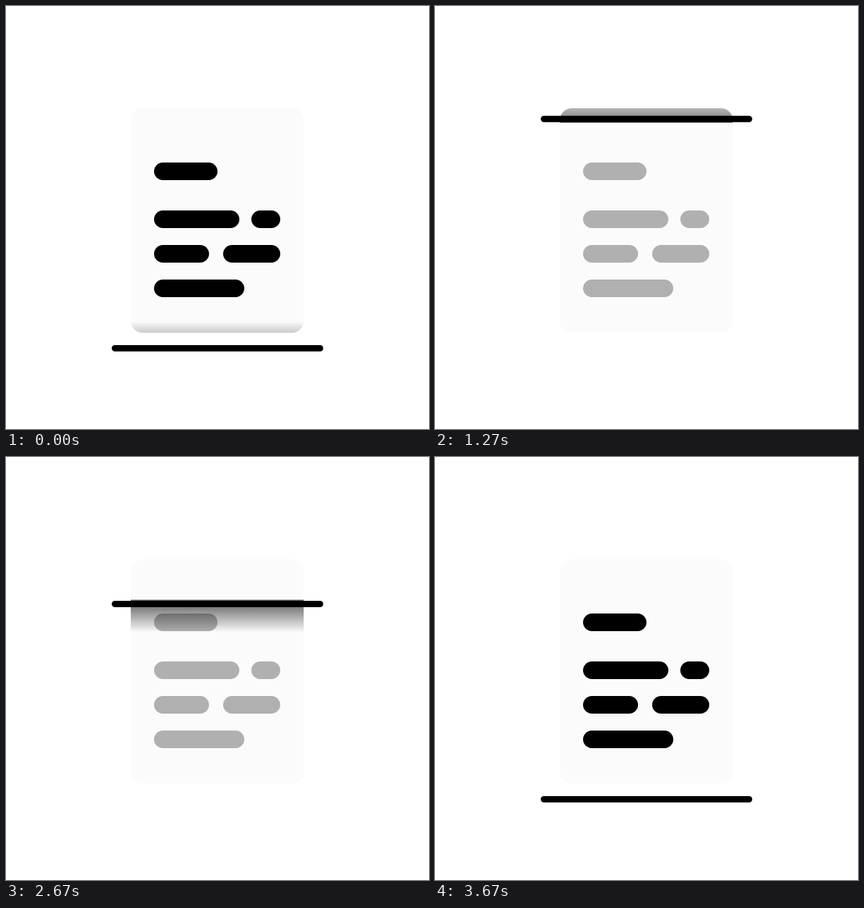
An HTML page with a canvas that plays this animation: 600 px wide and 600 px high, repeating every 3.81 s.

```html
<!DOCTYPE html>
<html>
<head>
<meta charset="utf-8">
<style>
  html, body { margin: 0; width: 100%; height: 100%; overflow: hidden; background: #fff; }
  canvas { display: block; width: 600px; height: 600px; }
</style>
</head>
<body>
<canvas id="stage" width="600" height="600"></canvas>
<script>
const ctx = document.getElementById('stage').getContext('2d');

const LOOP = 3810;
const HALF = 55;               // steps for one sweep, at 30 steps per second
const BOTTOM = 485.5, TRAVEL = 360;
const PAGE = [177, 145, 245.5, 318.5];
const PILLS = [
  [210, 222, 90],
  [210, 290, 121], [348, 290, 41],
  [210, 339, 78], [308, 339, 81],
  [210, 388, 128]
];

const clamp01 = v => Math.min(1, Math.max(0, v));
const bezier = (s, a, b) => 3 * (1 - s) * (1 - s) * s * a + 3 * (1 - s) * s * s * b + s * s * s;

function ease(x) {
  let lo = 0, hi = 1;
  for (let i = 0; i < 30; i++) {
    const mid = (lo + hi) / 2;
    if (bezier(mid, 0.275, 0.37) < x) lo = mid; else hi = mid;
  }
  return bezier(lo, 0, 1);
}

function roundRect(x, y, w, h, r) {
  ctx.beginPath();
  ctx.roundRect(x, y, w, h, r);
}

function pills(color, top, bottom) {
  ctx.save();
  ctx.beginPath();
  ctx.rect(0, top, 600, bottom - top);
  ctx.clip();
  ctx.fillStyle = color;
  for (const [x, y, w] of PILLS) {
    roundRect(x, y, w, 25, 12.5);
    ctx.fill();
  }
  ctx.restore();
}

// Shadow ahead of the bar, limited to the page; darkest at `from`.
function glow(from, to, alpha) {
  const gradient = ctx.createLinearGradient(0, from, 0, to);
  gradient.addColorStop(0, `rgba(0,0,0,${alpha})`);
  gradient.addColorStop(1, 'rgba(0,0,0,0)');
  ctx.save();
  roundRect(...PAGE, 17);
  ctx.clip();
  ctx.fillStyle = gradient;
  ctx.fillRect(PAGE[0], Math.min(from, to), PAGE[2], Math.abs(to - from));
  ctx.restore();
}

function draw(time) {
  const step = Math.floor((time + 3.4) * 0.03);
  const rising = step <= HALF;
  const phase = clamp01((rising ? step : 2 * HALF - step) / HALF);
  const y = BOTTOM - TRAVEL * ease(phase);

  ctx.fillStyle = '#fff';
  ctx.fillRect(0, 0, 600, 600);
  ctx.fillStyle = '#fbfbfb';
  roundRect(...PAGE, 17);
  ctx.fill();

  if (rising) glow(y + 5.5, y - 38, 0.53);
  pills('#000', 0, y);
  pills('#b0b0b0', y, 600);
  if (!rising) glow(y - 6, y + 40, 0.66 * clamp01((step - 63.6) / 8));

  ctx.fillStyle = '#000';
  roundRect(150, y - 4.5, 300, 9, 4.5);
  ctx.fill();
}

const start = performance.now();
function tick() {
  draw((performance.now() - start) % LOOP);
  requestAnimationFrame(tick);
}
tick();
</script>
</body>
</html>
```
